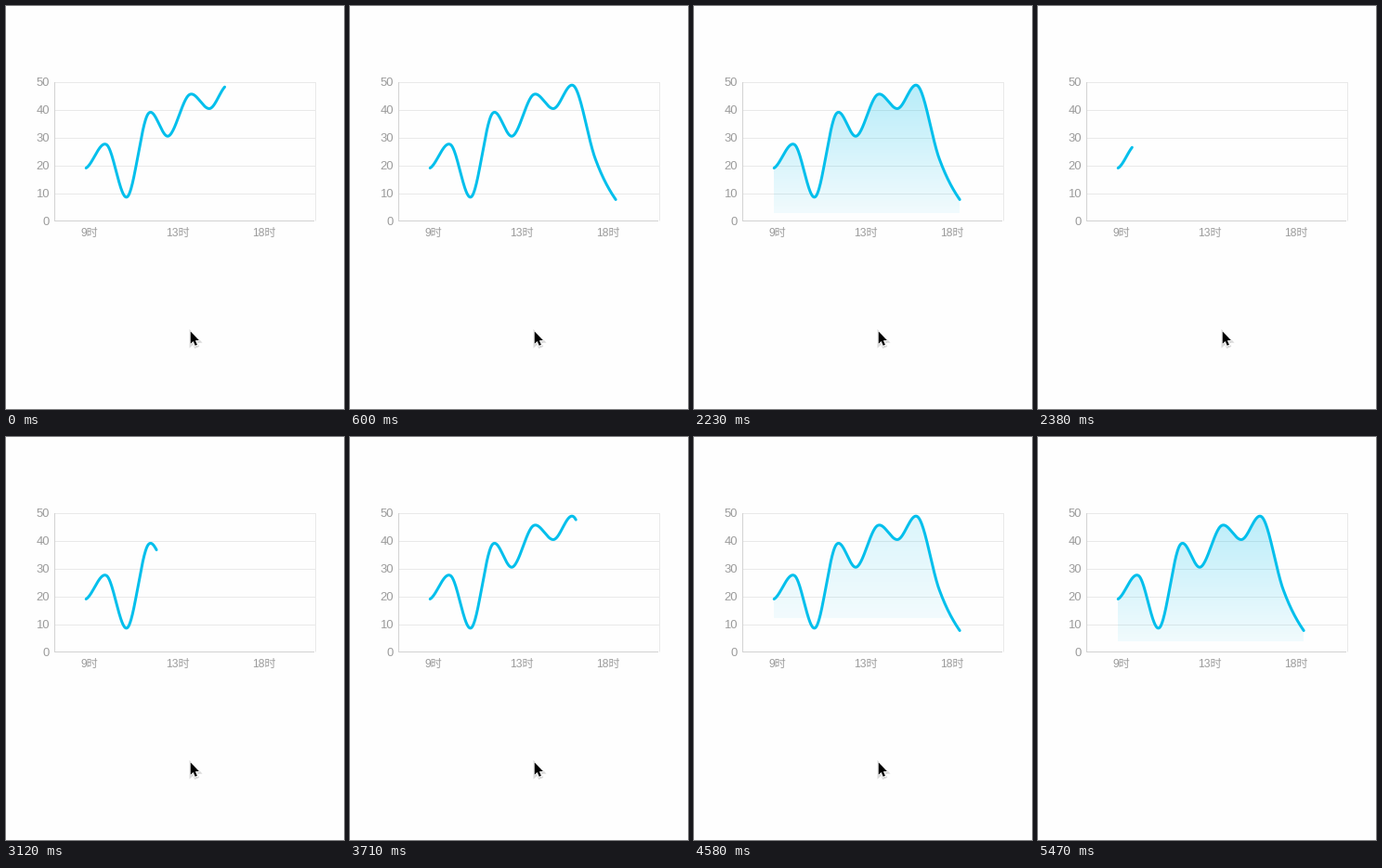
Write a matplotlib script that moves like this. It is 364 px wide and 434 px high and loops after 5.73 s.

```python
import numpy as np
import matplotlib.pyplot as plt
from matplotlib.animation import FuncAnimation
from matplotlib.patches import Polygon

W, H, DPI = 364, 434, 64
LOOP, TICK = 5730, 10
PX = 72 / DPI  # points per pixel
BLUE = "#00bfec"
GRID, AXIS = "#e9e9e9", "#d2d2d2"
LEFT, RIGHT, TOP, BOTTOM = 52.5, 333.5, 82.5, 231.5
ROW = 30  # pixels between grid lines

REFRESH = 147.7  # the picture advances in steps of this many ms
DRAW_TIME = 1976
FIRST_START, SECOND_START = -1400, 2250
CURSOR_LEAVES, CURSOR_GONE = 4580, 5460


def smooth_curve(xs, ys, samples=60):
    """Catmull-Rom spline through evenly spaced points."""
    m = np.gradient(ys)
    m[0] *= 0.5
    m[-1] *= 0.72
    u = np.linspace(0, len(ys) - 1, (len(ys) - 1) * samples + 1)
    i = np.minimum(u.astype(int), len(ys) - 2)
    s = u - i
    y = ((2 * s**3 - 3 * s**2 + 1) * ys[i] + (s**3 - 2 * s**2 + s) * m[i]
         + (3 * s**2 - 2 * s**3) * ys[i + 1] + (s**3 - s**2) * m[i + 1])
    return np.interp(u, np.arange(len(xs)), xs), y


key_y = np.array([174.5, 149.4, 205.5, 116.4, 140, 95.6, 110.4, 86.8, 164, 208.5])
curve_x, curve_y = smooth_curve(np.linspace(86.2, 286.2, len(key_y)), key_y)
length = np.r_[0, np.cumsum(np.hypot(np.diff(curve_x), np.diff(curve_y)))]
length /= length[-1]

fig = plt.figure(figsize=(W / DPI, H / DPI), dpi=DPI, facecolor="#fefefe")
ax = fig.add_axes([0, 0, 1, 1])

# area under the curve, one array cell per pixel
area_x, area_y = np.meshgrid(np.arange(86, 286) + 0.5, np.arange(82, 232) + 0.5)
under_curve = area_y > np.interp(area_x, curve_x, curve_y)
shade = np.interp(area_y, [82, 232], [0.30, 0.04]) * under_curve
area_rgba = np.zeros(shade.shape + (4,))
area_rgba[..., :3] = 0, 0.75, 0.93
area = ax.imshow(area_rgba, extent=(86, 286, 232, 82), aspect="auto",
                 interpolation="nearest", zorder=2)

ax.set(xlim=(0, W), ylim=(H, 0))
ax.axis("off")


def rule(x0, y0, x1, y1, color):
    ax.plot([x0, x1], [y0, y1], color=color, lw=PX, snap=False,
            solid_capstyle="butt", zorder=1)


def label(x, y, text, align, size):
    ax.text(x, y, text, ha=align, va="baseline", color="#9b9b9b",
            fontsize=size * PX, family=["Liberation Sans", "Noto Sans CJK JP"])


for row in range(6):
    y = TOP + ROW * row
    label(47, y + 3.7, str(50 - 10 * row), "right", 13)
    if row < 5:
        rule(LEFT, y, RIGHT, y, GRID)
for hour, x in ((9, 90), (13, 185), (18, 278)):
    label(x, 248, f"{hour}时", "center", 12)
rule(RIGHT, TOP - 0.5, RIGHT, BOTTOM, GRID)
rule(LEFT, TOP - 0.5, LEFT, BOTTOM, AXIS)
rule(LEFT - 0.5, BOTTOM, RIGHT - 1.5, BOTTOM, AXIS)

line, = ax.plot([], [], color=BLUE, lw=3 * PX, solid_capstyle="round",
                solid_joinstyle="round", snap=False, zorder=3)

arrow = np.array([(0, 0), (0, 13.4), (3, 10.6), (5, 15.3), (7.2, 14.4),
                  (5.2, 9.8), (9.2, 9.6)])


def arrow_layer(color, outline, alpha, zorder):
    return ax.add_patch(Polygon(arrow, fc=color, ec=color, lw=outline * PX,
                                alpha=alpha, snap=False, zorder=zorder))


shadow = arrow_layer("black", 3, 0.14, 5)
border = arrow_layer("white", 2, 1, 6)
body = arrow_layer("black", 0, 1, 7)


def draw_line(progress):
    progress = min(progress, 1)
    shown = length < progress
    tip_x = np.interp(progress, length, curve_x)
    tip_y = np.interp(progress, length, curve_y)
    line.set_data(np.r_[curve_x[shown], tip_x], np.r_[curve_y[shown], tip_y])


def draw_area(since):
    visible = since > 100
    area.set_visible(visible)
    if visible:
        opacity = 1 - np.exp(-since / 540)
        cut = BOTTOM - (64 - 58 * opacity)
        area_rgba[..., 3] = shade * opacity * (area_y < cut)
        area.set_data(area_rgba)


def draw_cursor(now):
    u = np.clip((now - CURSOR_LEAVES) / (CURSOR_GONE - CURSOR_LEAVES), 0, 1)
    position = arrow + (198.7 + 152 * u, 350.4 + 90 * u)
    shadow.set_xy(position + (0.3, 1.3))
    border.set_xy(position)
    body.set_xy(position)
    for layer in (shadow, border, body):
        layer.set_visible(u < 1)


def update(frame):
    now = frame * TICK // REFRESH * REFRESH
    elapsed = now - (FIRST_START if now < SECOND_START else SECOND_START)
    draw_line(elapsed / DRAW_TIME)
    draw_area(elapsed - DRAW_TIME)
    draw_cursor(now)
    return line, area, shadow, border, body


anim = FuncAnimation(fig, update, frames=LOOP // TICK, interval=TICK,
                     repeat=True, repeat_delay=0, blit=False)
plt.show()
```
